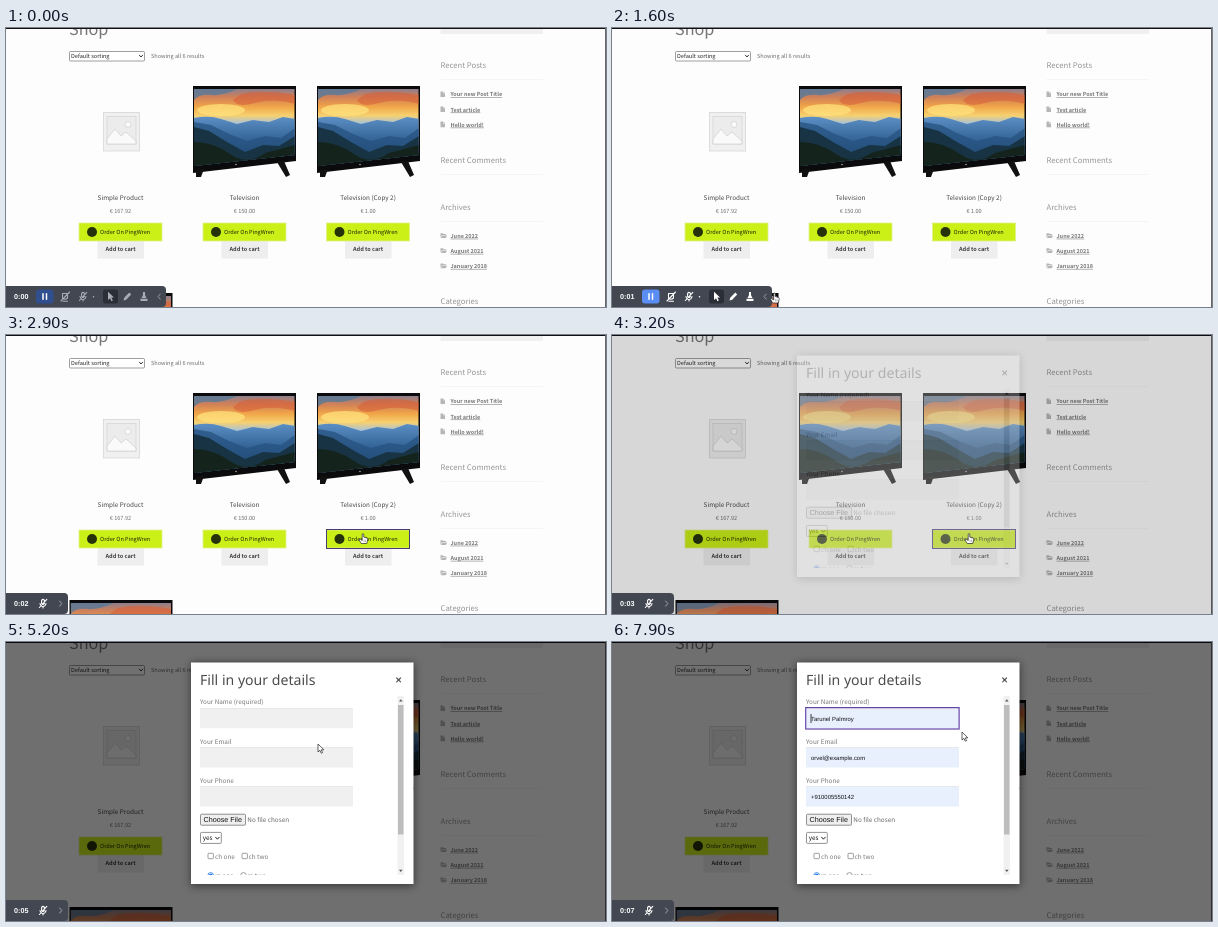
An HTML page for the animation above (8000 ms loop, 600 px wide and 279 px high).

```html
<!DOCTYPE html>
<html lang="en">
<head>
<meta charset="utf-8">
<title>Shop order form</title>
<style>
  html, body { margin: 0; width: 100%; height: 100%; overflow: hidden; background: #fff; }
  svg { display: block; width: 600px; height: 279px; }
  text { font-family: "Noto Sans CJK SC", "Noto Sans CJK JP", "Noto Sans", sans-serif; text-rendering: geometricPrecision; white-space: pre; }
  .ui { font-family: "Liberation Sans", Arial, sans-serif; }
  .title { font-family: "Noto Sans", "Open Sans", sans-serif; }
  .line { fill: none; stroke: currentColor; stroke-linecap: round; stroke-linejoin: round; }
</style>
</head>
<body>
<svg viewBox="0 0 600 279" xmlns="http://www.w3.org/2000/svg">
  <defs>
    <linearGradient id="sky" x1="0" y1="0" x2="0" y2="1">
      <stop offset="0" stop-color="#8d7f8c"/>
      <stop offset=".1" stop-color="#d08058"/>
      <stop offset=".22" stop-color="#f0a548"/>
      <stop offset=".33" stop-color="#f6d070"/>
      <stop offset=".43" stop-color="#a9c3d8"/>
    </linearGradient>
    <linearGradient id="hill" x1="0" y1="0" x2="0" y2="1">
      <stop offset="0" stop-color="#5c8fc4"/>
      <stop offset=".5" stop-color="#2f5f92"/>
      <stop offset="1" stop-color="#14283c"/>
    </linearGradient>
    <filter id="soft" x="-20%" y="-20%" width="140%" height="140%"><feGaussianBlur stdDeviation="4"/></filter>
    <clipPath id="screen"><path d="M1 3H101.5V69L1 80Z"/></clipPath>
    <clipPath id="form"><rect x="186" y="53" width="220" height="180"/></clipPath>
    <g id="tv">
      <path d="M0 0H103V75L0 87Z" fill="#0b0b0d"/>
      <path d="M3 84L11 83 8 91H3ZM84 76L91 75 97 89 93 91Z" fill="#111"/>
      <g clip-path="url(#screen)">
        <rect x="1" y="3" width="101" height="80" fill="url(#sky)"/>
        <path d="M1 3H44Q30 10 18 9T1 14Z" fill="#5b7896" opacity=".8"/>
        <path d="M48 8Q70 3 102 9V18Q80 12 62 17T40 14Z" fill="#d8603a" opacity=".6"/>
        <ellipse cx="28" cy="24" rx="24" ry="6" fill="#ffe27c" opacity=".75"/>
        <path d="M1 32Q16 29 28 33L44 38 60 34 76 36 90 31 102 33V83H1Z" fill="url(#hill)"/>
        <path d="M1 36L18 39 36 48 54 55 72 50 88 52 102 42V83H1Z" fill="#26527f" opacity=".75"/>
        <path d="M1 41L16 45 34 56 52 66 70 59 86 60 102 50V83H1Z" fill="#183444"/>
        <path d="M1 56Q20 56 37 68T72 67L102 59V83H1Z" fill="#14231c"/>
      </g>
      <circle cx="43" cy="78.5" r=".8" fill="#aaa"/>
    </g>
    <g id="micOff" class="line" stroke-width="1.1">
      <path d="M-1.4 -3.2Q0 -5 1.4 -3.2V0Q0 2 -1.4 0ZM-3 0Q-2.4 3 0 3T3 0M0 3V4.5M-3.6 4L3.8 -4.2"/>
    </g>
  </defs>
  <g id="page"></g>
  <rect id="shade" width="600" height="279" fill="#000"/>
  <g id="modal"></g>
  <g id="bar"></g>
  <g id="hand">
    <path d="M-.8 .6Q0 -.6 .8 .6V3.6L4 4.5Q5 5 4.7 6.4L3.8 10H-1.7L-3.9 6.6Q-4 5.2 -2.7 5.7L-.8 7Z" fill="#fff" stroke="#222" stroke-width=".7"/>
    <path d="M1.1 6V8.5M2.6 6V8.5" stroke="#555" stroke-width=".4"/>
  </g>
  <path id="arrow" d="M0 0V8L1.9 6.3 3.2 9.2 4.6 8.6 3.3 5.8H5.9Z" fill="#fff" stroke="#222" stroke-width=".7"/>
</svg>
<script>
const LOOP = 8000;
const WAKE = 400, COLLAPSE = 2000, PRESS = 2750, OPEN = 3100, FADE = 300;
const FOCUS = 6400, FILL = 7250;
const BODY = 6.37, SMALL = 5.6, FIELD = 5.93;

const $ = id => document.getElementById(id);
const rect = (x, y, w, h, fill, extra = '') =>
  `<rect x="${x}" y="${y}" width="${w}" height="${h}" fill="${fill}" ${extra}/>`;
const text = (x, y, size, fill, str, extra = '') =>
  `<text x="${x}" y="${y}" font-size="${size}" fill="${fill}" ${extra}>${str}</text>`;
const path = (d, color, width = 1) =>
  `<path class="line" d="${d}" style="color:${color}" stroke-width="${width}"/>`;
const MID = 'text-anchor="middle"';

function product(cx, name, price) {
  return text(cx, 172, BODY, '#444', name, MID)
    + text(cx, 184.8, SMALL, '#6d6d6d', price, MID)
    + rect(cx - 23, 212, 46.5, 18.5, '#eee')
    + text(cx, 223.4, SMALL, '#3c3c3c', 'Add to cart', MID + ' font-weight="600"')
    + rect(cx - 41.5, 195, 83, 18, '#cbf018', 'stroke="#e0ef8a" stroke-width=".8"')
    + `<circle cx="${cx - 28.5}" cy="204" r="5" fill="#26320a"/>`
    + text(cx - 20.5, 206.3, SMALL, '#1c2400', 'Order On PingWren', 'font-weight="500"');
}

function placeholder() {
  return rect(97.5, 84.5, 36, 38.5, '#f0f0f0', 'stroke="#d6d6d6" stroke-width=".8"')
    + rect(101, 88.5, 29, 27.5, '#ececec', 'stroke="#d0d0d0" stroke-width=".6"')
    + '<path d="M101 111L109 101 115 108 120 104 130 113V116H101Z" fill="#fafafa" stroke="#c8c8c8" stroke-width=".6"/>'
    + '<circle cx="122" cy="96.5" r="3" fill="#fafafa" stroke="#c8c8c8" stroke-width=".6"/>';
}

function widget(y, title, items = [], folder = false) {
  const icon = folder
    ? 'M0 -4.5H2.5L3.2 -3.6H5.5V-2.7H1.6L0 0ZM1.8 -2.2H6.6L5.2 .3H.4Z'
    : 'M0 -5H2.6V-3.2H4.5V.6H0ZM3.1 -5L4.5 -3.7H3.1Z';
  return text(434.5, y, 7.7, '#969696', title, 'font-weight="300"')
    + rect(434.5, y + 11.5, 102.5, .6, '#f0f0f0')
    + items.map((s, i) => {
      const b = y + (folder ? 28 : 28.8) + i * 15.1;
      return `<path transform="translate(434.5 ${b})" d="${icon}" fill="#b5b5b5"/>`
        + text(444.5, b, 5.5, '#777', s, 'font-weight="600" text-decoration="underline"');
    }).join('');
}

$('page').innerHTML = rect(0, 0, 600, 279, '#fefdfe')
  + text(63, 6.5, 16.2, '#777', 'Shop', 'font-weight="300"')
  + rect(434.5, 0, 102.5, 6, '#f0f0f0')
  + rect(0, 0, 600, 1, '#111')
  + rect(599, 0, 1, 279, '#666')
  + rect(63.5, 23.5, 75, 9.5, '#fff', 'rx="1" stroke="#777" stroke-width=".7"')
  + text(65, 30.4, SMALL, '#222', 'Default sorting')
  + path('M133.4 27.2L135 29 136.6 27.2', '#222', .9)
  + text(145, 30.2, SMALL, '#6d6d6d', 'Showing all 6 results')
  + placeholder()
  + [[187, 58], [311, 58], [63.5, 265]].map(([x, y]) => `<use href="#tv" x="${x}" y="${y}"/>`).join('')
  + product(114.5, 'Simple Product', '€ 167.92')
  + product(238.5, 'Television', '€ 150.00')
  + product(362, 'Television (Copy 2)', '€ 1.00')
  + rect(320.5, 194.5, 83, 19, 'none', 'id="ring" stroke="#4a3a78" stroke-width="1"')
  + widget(39.6, 'Recent Posts', ['Your new Post Title', 'Test article', 'Hello world!'])
  + widget(134.5, 'Recent Comments')
  + widget(181.7, 'Archives', ['June 2022', 'August 2021', 'January 2018'], true)
  + widget(275.8, 'Categories');

const fields = [
  [66, 'Your Name (required)', 'Tarunel Palmroy'],
  [105.3, 'Your Email', 'orvel@example.com'],
  [144.4, 'Your Phone', '+910005550142']
];
const choice = (x, y, str) => text(x, y, BODY, '#777', str);
const box = x => rect(x, 211.3, 5.4, 5.4, '#fff', 'rx=".8" stroke="#767676" stroke-width=".7"');

$('modal').innerHTML = rect(185, 21, 223, 223, '#000', 'opacity=".5" filter="url(#soft)"')
  + rect(185, 20.5, 222.5, 221.5, '#fff')
  + text(194, 43, 14.1, '#4c4c4c', 'Fill in your details', 'class="title"')
  + path('M390.7 36L394.5 39.8M394.5 36L390.7 39.8', '#555', 1.2)
  + '<g clip-path="url(#form)">'
  + fields.map(([y, label, value]) =>
      text(194, y - 3.8, BODY, '#777', label)
      + rect(194, y, 153, 20.2, '#f0f0f0', 'class="field"')
      + rect(194, y, 153, .6, '#e2e2e2')
      + text(199, y + 12.6, FIELD, '#111', value, 'class="ui value"')).join('')
  + rect(194.5, 172.2, 45, 11, '#efefef', 'rx="1" stroke="#767676" stroke-width=".8"')
  + text(197.6, 180.3, 7.2, '#111', 'Choose File', 'class="ui"')
  + text(241.3, 180.2, BODY, '#666', 'No file chosen')
  + rect(194.5, 190.4, 20.8, 11, '#fff', 'rx="1" stroke="#767676" stroke-width=".8"')
  + text(196.8, 198.4, BODY, '#111', 'yes')
  + path('M209.6 195.2L211.4 197.2 213.2 195.2', '#222', 1)
  + box(202) + choice(209, 217, 'ch one') + box(236) + choice(242.5, 217, 'ch two')
  + '<circle cx="204.7" cy="233.4" r="2.8" fill="#fff" stroke="#1a73e8" stroke-width=".8"/><circle cx="204.7" cy="233.4" r="1.7" fill="#1a73e8"/>'
  + '<circle cx="237.5" cy="233.4" r="2.8" fill="#fff" stroke="#767676" stroke-width=".7"/>'
  + choice(209, 236, 'ra one') + choice(241.5, 236, 'ra two')
  + rect(391.5, 54, 6.5, 179, '#f1f1f1') + rect(392, 63, 5.5, 129.5, '#bdbdbd')
  + '<path d="M393 59.5L394.8 57.3 396.6 59.5ZM393 227.8L394.8 230 396.6 227.8Z" fill="#555"/></g>'
  + rect(193.7, 65.6, 153.4, 21.4, 'none', 'id="focus" stroke="#6447a8" stroke-width="1.2"')
  + rect(198.6, 72, .8, 9, '#111', 'id="caret"');

$('bar').innerHTML = '<path id="back" fill="#434752"/>'
  + text(8, 271.2, 7.2, '#fff', '', 'id="clock" class="ui" font-weight="700"')
  + '<g id="tools">'
  + rect(30, 261.5, 17.5, 14, '#5b8ef4', 'id="pause" rx="3"')
  + path('M37 265.7V271.3M40.5 265.7V271.3', '#fff', 1.5)
  + rect(97, 261.5, 15, 14, '#2b2e37', 'rx="2.5"')
  + '<g id="icons">'
  + '<path class="line" stroke-width="1.1" d="M56.5 265.5H61.5V270Q59 272.5 56.5 270ZM57 273.3H61.5M55 273L63.5 264"/>'
  + '<use href="#micOff" x="77" y="268.5"/><circle cx="87.5" cy="268.8" r=".8" fill="currentColor"/>'
  + '<path d="M102 263.8V272L104 270.2 105.5 273.2 106.8 272.5 105.4 269.6H108Z" fill="currentColor"/>'
  + '<path d="M117.5 272.5L118.2 269.8 123.3 264.5 125.2 266.4 120.2 271.7Z" fill="currentColor"/>'
  + '<path d="M137 264H139V267L140.5 270H135.5L137 267ZM134.5 270.7H141.5V273H134.5Z" fill="currentColor"/></g>'
  + path('M154.2 266L152 268.6 154.2 271.2', '#9497a0')
  + '</g><g id="mini" style="color:#fff"><use href="#micOff" x="37" y="268.5"/>'
  + path('M53.6 266L55.8 268.6 53.6 271.2', '#9fa2aa') + '</g>';

// Pointer tracks: time, x, y of the tip
const handTrack = [[900, 172, 281], [1250, 162.5, 265], [1600, 162.5, 265], [1850, 153, 266],
  [2050, 153, 266], [2600, 357, 198.5]];
const arrowTrack = [[4350, 366, 31], [4600, 367, 100], [4800, 367, 100], [5100, 312, 102], [5600, 312, 102],
  [5900, 298, 92], [6200, 286, 90], [6400, 286, 77], [6550, 286, 77], [6750, 286.5, 97],
  [7200, 286.5, 97], [7400, 350, 90]];

const clamp = v => Math.min(1, Math.max(0, v));
const ease = v => v * v * (3 - 2 * v);

function along(track, t) {
  let i = 0;
  while (i < track.length - 2 && t >= track[i + 1][0]) i++;
  const [t0, x0, y0] = track[i], [t1, x1, y1] = track[i + 1];
  const k = ease(clamp((t - t0) / (t1 - t0)));
  return `translate(${x0 + (x1 - x0) * k} ${y0 + (y1 - y0) * k})`;
}

const show = (id, on) => $(id).setAttribute('visibility', on ? 'visible' : 'hidden');
const inputs = document.querySelectorAll('.field');
const values = document.querySelectorAll('.value');

function draw(t) {
  const awake = t >= WAKE, mini = t >= COLLAPSE, filled = t >= FILL;
  const k = ease(clamp((t - OPEN) / FADE));

  show('ring', t >= PRESS);
  $('shade').setAttribute('opacity', .56 * k);
  $('modal').setAttribute('opacity', k);
  show('modal', k > 0);

  inputs.forEach(f => f.setAttribute('fill', filled ? '#e8f0fe' : '#f0f0f0'));
  values.forEach(v => v.setAttribute('visibility', filled ? 'visible' : 'hidden'));
  show('focus', t >= FOCUS);
  show('caret', t >= FOCUS && (t - FOCUS - 50) % 1000 < 500);

  const w = mini ? 62 : 160;
  $('back').setAttribute('d', `M0 258H${w - 4}Q${w} 258 ${w} 262V275Q${w} 279 ${w - 4} 279H0Z`);
  $('clock').textContent = '0:0' + Math.floor(t / 1000);
  $('pause').setAttribute('fill', awake ? '#5b8ef4' : '#2f4f8f');
  $('icons').style.color = awake ? '#fff' : '#a9acb5';
  show('tools', !mini);
  show('mini', mini);

  show('hand', t >= 900 && t < OPEN + FADE);
  $('hand').setAttribute('transform', along(handTrack, t));
  show('arrow', t >= 4350);
  $('arrow').setAttribute('transform', along(arrowTrack, t));
}

function tick() {
  draw(performance.now() % LOOP);
  requestAnimationFrame(tick);
}
tick();
</script>
</body>
</html>
```
